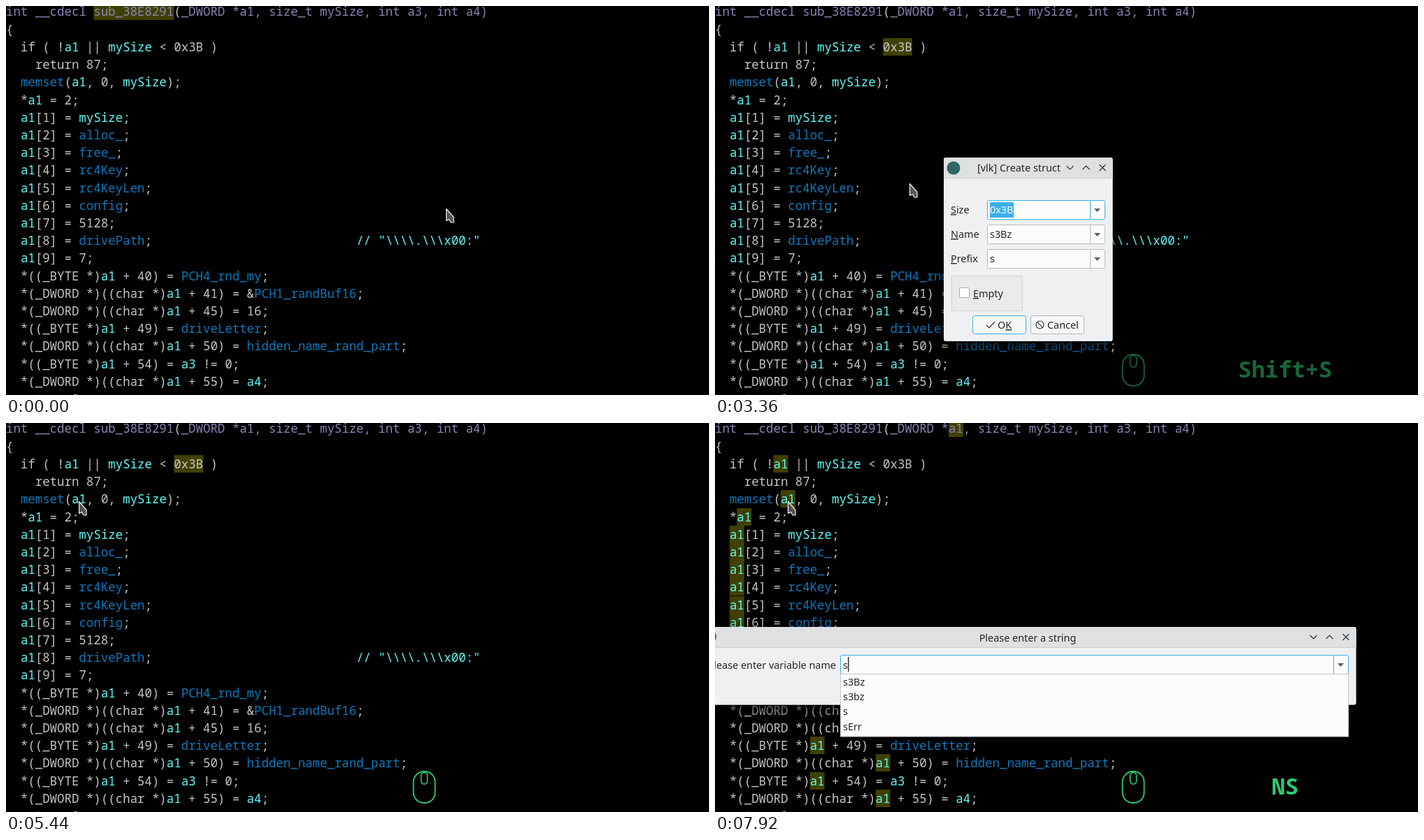
Animation of 1005x557 px, one loop 8 s. Source, as an HTML page:

```html
<!DOCTYPE html>
<html lang="en">
<head>
<meta charset="utf-8">
<title>Create struct</title>
<style>
html, body { margin: 0; width: 100%; height: 100%; overflow: hidden; background: #000; }
svg { display: block; width: 100%; height: 100%; }
text { white-space: pre; }
.code { font: 17.4px "Noto Sans Mono", monospace; fill: #c5c5c5; }
.head { fill: #8585b5; }
.var { fill: #5ffbf7; }
.glob { fill: #0f78b8; }
.note { fill: #e6dc12; }
.mark { fill: #404000; }
.tip { fill: #280d13; stroke: #b9adb0; }
.ui { font: 14.4px "Noto Sans", sans-serif; fill: #232629; }
.key { font: bold 32px "Noto Sans Mono", monospace; fill: #2ecc71; text-anchor: middle; }
.line { fill: none; stroke: #31363b; stroke-width: 1.2; }
.pick { fill: #3daee9; }
.edge { stroke: #b9bbbd; }
.focus .edge { stroke: #3daee9; }
.ticked .focus .edge { stroke: #b9bbbd; }
.u { text-decoration: underline; }
</style>
</head>
<body>
<svg id="stage" viewBox="0 0 1005 557" preserveAspectRatio="none"></svg>
<script>
const CW = 10.44, LOOP = 8000, STEP = 80;
const baseline = row => Math.round(14.49 + row * 25.205);

const source = String.raw`int __cdecl sub_38E8291(_DWORD *a1, size_t mySize, int a3, int a4)
{
  if ( !a1 || mySize < 0x3B )
    return 87;
  memset(a1, 0, mySize);
  *a1 = 2;
  a1[1] = mySize;
  a1[2] = alloc_;
  a1[3] = free_;
  a1[4] = rc4Key;
  a1[5] = rc4KeyLen;
  a1[6] = config;
  a1[7] = 5128;
  a1[8] = drivePath;                            // "\\\\.\\\x00:"
  a1[9] = 7;
  *((_BYTE *)a1 + 40) = PCH4_rnd_my;
  *(_DWORD *)((char *)a1 + 41) = &PCH1_randBuf16;
  *(_DWORD *)((char *)a1 + 45) = 16;
  *((_BYTE *)a1 + 49) = driveLetter;
  *(_DWORD *)((char *)a1 + 50) = hidden_name_rand_part;
  *((_BYTE *)a1 + 54) = a3 != 0;
  *(_DWORD *)((char *)a1 + 55) = a4;
  return 0;`.split("\n");

const esc = s => s.replace(/&/g, "&amp;").replace(/</g, "&lt;");
const span = (cls, s) => `<tspan class="${cls}">${esc(s)}</tspan>`;
const rect = (x, y, w, h, attrs = "") => `<rect x="${x}" y="${y}" width="${w}" height="${h}" ${attrs}/>`;
const ui = (x, y, s, attrs = "") => `<text class="ui" x="${x}" y="${y}" ${attrs}>${s}</text>`;
const mnemonic = s => `<tspan class="u">${s[0]}</tspan>${s.slice(1)}`;

// Code view
const tokens = /(\/\/.*)|\b(a1|a3|a4|mySize)\b|\b(memset|alloc_|free_|rc4Key(?:Len)?|config|drive\w+|PCH\w+|hidden_\w+)\b|([^\/\w]+|\w+)/g;
function paint(line, row) {
  if (row === 0) {
    const cut = line.indexOf("(");
    return span("head", line.slice(0, cut)) + "(" + span("head", line.slice(cut + 1));
  }
  return line.replace(tokens, (s, note, local, global) =>
    note || local ? span("var", s) : global ? span("glob", s) : esc(s));
}
function marks(word) {
  let out = "";
  source.forEach((line, row) => {
    for (let i = line.indexOf(word); i >= 0; i = line.indexOf(word, i + 1))
      out += rect(i * CW, baseline(row) - 19, word.length * CW, 25, 'class="mark"');
  });
  return out;
}
const code = source.map((line, i) =>
  `<text class="code" x="0" y="${baseline(i)}">${paint(line, i)}</text>`).join("");

// Dialog parts
const frame = (x, y, w, h) =>
  rect(x, y, w, h, 'rx="3" fill="#eff0f1" filter="url(#shadow)"') +
  `<path d="M${x} ${y + 29.5}V${y + 3}q0-3 3-3H${x + w - 3}q3 0 3 3V${y + 29.5}Z" fill="#dee0e2"/>` +
  `<path d="M${x} ${y + 29.5}h${w}" stroke="#c9cbcd"/>` +
  `<path class="line" d="M${x + w - 66} ${y + 12}l5 5 5-5m13 5l5-5 5 5m14-7l9 9m0-9l-9 9"/>`;
const field = (x, y, w, focus) => `<g class="${focus ? "focus" : ""}">` +
  rect(x + .5, y + .5, w - 1, 27, 'class="edge" rx="2" fill="#fcfcfc"') +
  `<path class="edge" d="M${x + w - 21.5} ${y + 1}v26"/>` +
  `<path d="M${x + w - 16} ${y + 12}h9l-4.5 5z" fill="#5b5f63"/></g>`;
const button = (x, y, focus) =>
  rect(x + .5, y + .5, 76, 26, `rx="3" fill="#f6f7f7" stroke="${focus ? "#3daee9" : "#b4b6b8"}"`);
const buttons = (x, y) =>
  button(x, y, true) + `<path class="line" d="M${x + 20} ${y + 14}l4 4 8-9"/>` +
  ui(x + 36, y + 19, 'O<tspan class="u">K</tspan>') +
  button(x + 83, y) + `<g class="line"><circle cx="${x + 96.5}" cy="${y + 13.5}" r="5.5"/>` +
  `<path d="M${x + 92.6} ${y + 9.6}l7.8 7.8"/></g>` + ui(x + 107, y + 19, "Cancel");
const row = (name, value, y, focus) =>
  ui(337, y + 19, mnemonic(name)) + field(389, y, 169, focus) +
  (focus ? '<rect id="sizePick" class="pick" x="393" y="281" width="34" height="22"/>' : "") +
  ui(393, y + 19, value, focus ? 'id="size"' : "");
const caret = (id, x, y, h, fill) => rect(x, y, 1.4, h, `id="${id}" fill="${fill}"`);

const structDialog = frame(327, 217, 241.5, 263) +
  '<circle cx="341" cy="232" r="9.5" fill="#2f6668"/>' +
  ui(434.5, 237, "[vlk] Create struct", 'text-anchor="middle"') +
  row("Size", "0x3B", 278, true) + row("Name", "s3Bz", 313) + row("Prefix", "s", 348) +
  rect(338.5, 386.5, 101, 50, 'fill="#e9eaeb" stroke="#cfd1d2"') +
  rect(349.5, 403.5, 14, 14, 'rx="1" fill="#fcfcfc" stroke="#a5a8aa"') +
  '<path id="check" d="M352 410l3.5 4 6-7.5" fill="none" stroke="#232629" stroke-width="2"/>' +
  ui(369, 417, mnemonic("Empty")) + buttons(368, 443) +
  caret("sizeCaret", 427, 281, 21, "#232629");

const popup = rect(179.5, 359.5, 726, 89.5, 'fill="#fcfcfc" stroke="#c4c6c8"') +
  ["s3Bz", "s3bz", "s", "sErr"].map((s, i) => ui(183, 375.5 + i * 21.4, s)).join("");

const nameDialog = frame(-22, 292, 938.5, 111.5) +
  '<circle cx="-7.5" cy="306" r="9.5" fill="#2f6668"/>' +
  ui(447, 313, "Please enter a string", 'text-anchor="middle"') +
  ui(173, 351.5, "Please enter variable name", 'text-anchor="end"') +
  field(179, 332, 727, true) +
  '<rect id="namePick" class="pick" x="183" y="335" width="17" height="22"/>' +
  ui(183, 351.5, "a1", 'id="name"') + buttons(367, 366) +
  caret("nameCaret", 199, 335, 21, "#232629");

document.getElementById("stage").innerHTML = `
  <defs><filter id="shadow" x="-30%" y="-50%" width="160%" height="200%">
    <feDropShadow dx="0" dy="8" stdDeviation="10" flood-color="#000" flood-opacity=".75"/>
  </filter></defs>
  <rect width="1005" height="557"/>
  <g id="markSub">${marks("sub_38E8291")}</g>
  <g id="markNum">${marks("0x3B")}</g>
  <g id="markVar">${marks("a1")}</g>
  ${code}
  ${caret("codeCaret", 260.5, 46, 25, "#fff")}
  ${caret("varCaret", 104, 96, 25, "#fff")}
  <g id="tipInt">${rect(276.5, 76.5, 34, 28, 'class="tip"')}
    <text class="code" x="277" y="97">${span("note", "int")}</text></g>
  <g id="tipVar">${rect(124.5, 137.5, 411, 27, 'class="tip"')}
    <text class="code" x="125.5" y="157">_DWORD *a1; ${span("note", "//")}${span("var", " [esp+10h] [ebp+8h] ISARG")}</text></g>
  <g id="structDialog">${structDialog}</g>
  <g id="nameDialog">${nameDialog}</g>
  <g id="popup">${popup}</g>
  <g id="mouse" fill="none" stroke="#2ecc71" stroke-width="1.8">
    <rect x="582.5" y="499" width="31" height="45" rx="15"/>
    <rect x="593.5" y="500.5" width="9" height="16.5" rx="4.5" stroke-width="1.6"/>
    <path id="press" d="M598 519.5H594Q589.5 517 589.5 510Q589.5 502 594 500"/>
  </g>
  <g id="shift">${rect(617, 531.5, 17.5, 9, 'fill="none" stroke="#2ecc71"')}
    <text x="625.7" y="538.5" text-anchor="middle" font-family="Noto Sans, sans-serif" font-size="6.5" fill="#2ecc71">Shift</text></g>
  <text id="keys" class="key" x="815" y="532"></text>
  <path id="keyLine" d="M806 535h18" stroke="#2ecc71" stroke-width="2"/>
  <path id="pointer" d="M.5.5V17.5L4.5 15.5L7 20H11V12.5Z" fill="#555" stroke="#f2f2f2" stroke-width="1.2" stroke-linejoin="round"/>`;

const el = {};
document.querySelectorAll("[id]").forEach(n => el[n.id] = n);

// Motion
const clamp = v => Math.min(1, Math.max(0, v));
const ramp = (t, a, b) => clamp((t - a) / (b - a));
const within = (t, ...spans) => spans.some(([a, b]) => t >= a && t < b);
const smooth = p => p * p * (3 - 2 * p);
const lerp = (a, b, p) => a + (b - a) * p;

// time, x, y, eased
const path = [
  [160, 629, 290], [840, 257, 54, true],
  [3180, 257, 54], [3360, 278, 254], [3840, 361, 417, true],
  [4080, 361, 417], [4400, 411, 456, true],
  [4720, 411, 456], [5360, 125, 121, true], [5440, 104, 112]
];
function pointerAt(t) {
  const i = path.findIndex(k => t < k[0]);
  if (i === 0) return path[0].slice(1, 3);
  if (i < 0) return path[path.length - 1].slice(1, 3);
  const a = path[i - 1], b = path[i];
  let p = ramp(t, a[0], b[0]);
  if (b[3]) p = smooth(p);
  return [lerp(a[1], b[1], p), lerp(a[2], b[2], p)];
}

function fade(node, o) {
  node.setAttribute("opacity", o);
  node.style.display = o > 0 ? "" : "none";
}
const show = (node, on) => fade(node, on ? 1 : 0);
function zoom(node, o, cx, cy) {
  fade(node, o);
  const s = 1 - .13 * (1 - o);
  node.setAttribute("transform", `translate(${cx} ${cy}) scale(${s}) translate(${-cx} ${-cy})`);
}
const opening = (t, a, b) => 1 - (1 - ramp(t, a, b)) ** 3;

function draw(t) {
  show(el.markSub, t < 880);
  show(el.markNum, within(t, [880, 5600]));
  show(el.markVar, t >= 5600);
  show(el.codeCaret, within(t, [880, 1120], [1360, 1680], [4640, 4880], [5120, 5360]));
  show(el.varCaret, within(t, [5600, 5840], [6080, 6240], [6320, 6640]));

  fade(el.tipInt, ramp(t, 1160, 1400) * (1 - ramp(t, 1760, 2000)));
  fade(el.tipVar, ramp(t, 6000, 6320) * (1 - ramp(t, 6560, 6740)));

  const leave = ramp(t, 4640, 4880) ** 2;
  zoom(el.structDialog, opening(t, 1800, 2080) * (1 - leave), 448, 348.5);
  const ticked = t >= 3920;
  el.structDialog.classList.toggle("ticked", ticked);
  show(el.sizePick, !ticked);
  el.size.style.fill = ticked ? "" : "#fff";
  show(el.check, ticked);
  show(el.sizeCaret, within(t, [2320, 2640], [2880, 3200]));

  zoom(el.nameDialog, opening(t, 6580, 6720), 447, 348);
  const typed = t >= 7760;
  show(el.namePick, !typed);
  el.name.textContent = typed ? "s" : "a1";
  el.name.style.fill = typed ? "" : "#fff";
  show(el.nameCaret, within(t, [6640, 7040], [7280, 7600], [7760, LOOP]));
  el.nameCaret.setAttribute("x", typed ? 190 : 199);
  fade(el.popup, ramp(t, 7700, 7900));

  const dim = 1 - ramp(t, 3200, 3520);
  fade(el.mouse, t < 880 ? 0 : t < 3840 ? dim : 1);
  show(el.press, within(t, [880, 1040], [3840, 4080], [4400, 4800], [5600, 5760]));
  show(el.shift, within(t, [1440, 2320]));
  el.keys.textContent = t >= 7760 ? "NS" : t >= 6560 ? "N" : within(t, [1600, 3520]) ? "Shift+S" : "";
  fade(el.keys, t < 3840 ? dim : 1);
  show(el.keyLine, within(t, [6560, 6640]));

  el.pointer.setAttribute("transform", `translate(${pointerAt(t)})`);
}

const start = performance.now();
function tick() {
  const t = (performance.now() - start) % LOOP;
  draw(Math.floor(t / STEP) * STEP);
  requestAnimationFrame(tick);
}
tick();
</script>
</body>
</html>
```
